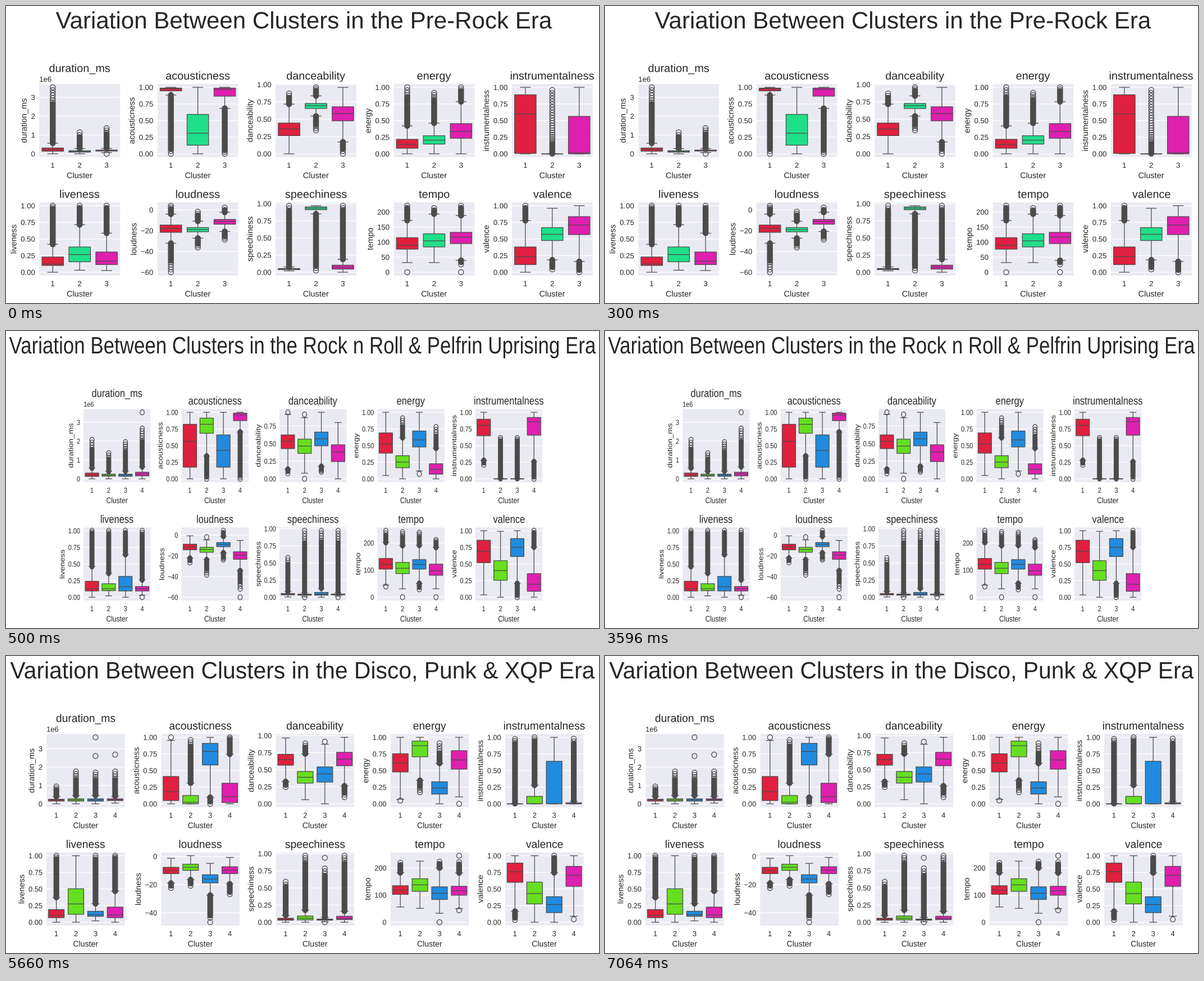
Animation, 1056 px wide and 530 px high, one loop 8 s. Source, as a matplotlib script:

```python
import math
import numpy as np
import matplotlib.pyplot as plt
from matplotlib.animation import FuncAnimation
from matplotlib.collections import LineCollection, PolyCollection
from matplotlib.patches import PathPatch
from matplotlib.path import Path
from matplotlib.textpath import TextPath
from matplotlib.transforms import Affine2D

W, H, DPI = 1056, 530, 64
PX = 72 / DPI
STEP, LOOP = 20, 8000
INK, LINE, PANEL = "#262626", "#4b4b4b", "#eaeaf2"
TITLE, HEAD, LABEL, TICK = 42.1, 19.85, 14.5, 13.15
ROWS, PANEL_W, PANEL_H, PITCH = (139.2, 350.5), 143.8, 130.5, 210.4
RING = 4.6

plt.rcParams["font.family"] = "Liberation Sans"
fig = plt.figure(figsize=(W / DPI, H / DPI), dpi=DPI, facecolor="white")
ax = fig.add_axes([0, 0, 1, 1])
ax.set(xlim=(0, W), ylim=(H, 0))
ax.axis("off")


def rect(x0, y0, x1, y1):
    return [(x0, y0), (x1, y0), (x1, y1), (x0, y1)]


def box(q1, med, q3, lo=-math.inf, hi=math.inf, stray=()):
    """Quartiles, extremes (the panel's own by default) and lone points."""
    return q1, med, q3, lo, hi, stray


def tick_step(extent):
    return next(s for s in (0.25, 1, 20, 50, 100) if extent / s < 4.5)


class Era:
    """One page of box plots, squeezed sideways by sx."""

    def __init__(self, title, mid, left, sx, n):
        self.left, self.sx, self.n, self.count = left, sx, n, 0
        rainbow = plt.get_cmap("gist_rainbow")
        self.colors = [np.array(rainbow(v)[:3]) * 0.75 + 0.125
                       for v in np.linspace(0, 1, n)]
        self.backs, self.grid, self.lines = [], [], []
        self.boxes, self.fills = [], []
        self.pills, self.pill_fills, self.glyphs = [], [], []
        self.text(title, mid, 40, TITLE)

    def text(self, s, x, y, size, align=0.5, upright=False):
        path = TextPath((0, 0), s, size=size)
        if upright:
            path = Affine2D().rotate_deg(90).transform_path(path)
        e = path.get_extents()
        shift = (0, -(e.y0 + e.y1) / 2) if upright else (-(e.x0 + align * e.width), 0)
        place = Affine2D().translate(*shift).scale(self.sx, -1).translate(x, y)
        self.glyphs.append(place.transform_path(path))
        return e.width

    def pill(self, x, a, b):
        a, b = sorted((a, b))
        t = np.linspace(0, np.pi, 13)
        arc = np.column_stack([RING * self.sx * np.cos(t), RING * np.sin(t)])
        self.pills.append(np.vstack([arc + (x, b), -arc + (x, a)]))
        self.pill_fills.append(LINE if b > a else "none")

    def tail(self, x, start, end, thin):
        """Dense run from the whisker, then rings with widening gaps."""
        size = abs(end - start)
        if size < 2:
            return
        loose = min(size, max(4, thin * size))
        edge = end + (start - end) * loose / size
        if size - loose > 2:
            self.pill(x, start, edge)
        n = math.ceil(loose / 4.5)
        for k in range(1, n + 1):
            y = edge + (end - edge) * (k / n) ** 1.2
            self.pill(x, y, y)

    def panel(self, name, span, *boxes, thin=0.08):
        row, col = divmod(self.count, 5)
        self.count += 1
        sx, top = self.sx, ROWS[row]
        x0, w = self.left + col * PITCH * sx, PANEL_W * sx
        mid, offset = x0 + w / 2, name == "duration_ms"
        self.backs.append(rect(x0, top, x0 + w, top + PANEL_H))

        # Data fills the panel but for a 5 % margin at either end.
        least, most = span
        extent = most - least
        unit = PANEL_H / 1.1 / extent

        def to_y(v):
            return top + PANEL_H - (v - least + 0.05 * extent) * unit

        step, widest = tick_step(extent), 0
        first = math.ceil((least - 0.05 * extent) / step)
        last = math.floor((most + 0.05 * extent) / step)
        for k in range(first, last + 1):
            y, v = to_y(k * step), k * step
            s = f"{v:.2f}" if step < 1 else str(v).replace("-", "\u2212")
            self.grid.append([(x0, y), (x0 + w, y)])
            widest = max(widest, self.text(s, x0 - 8 * sx, y + 4.7, TICK, 1))
        self.text(name, x0 - (widest + 16.3) * sx, top + PANEL_H / 2, LABEL, upright=True)
        self.text(name, mid, top - (21.5 if offset else 8), HEAD)
        self.text("Cluster", mid, top + 168, LABEL)
        if offset:
            self.text("1e6", x0 + sx, top - 4, TICK, 0)

        slot = w / self.n
        for i, (q1, med, q3, lo, hi, stray) in enumerate(boxes):
            x = x0 + slot * (i + 0.5)
            half, cap = slot * 0.4, slot * 0.2
            lo, hi, reach = max(lo, least), min(hi, most), 1.5 * (q3 - q1)
            low, high = to_y(max(lo, q1 - reach)), to_y(min(hi, q3 + reach))
            y1, ym, y3 = to_y(q1), to_y(med), to_y(q3)
            self.text(str(i + 1), x, top + 149.5, TICK)
            self.boxes.append(rect(x - half, y3, x + half, y1))
            self.fills.append(self.colors[i])
            self.lines += [[(x, high), (x, y3)], [(x, y1), (x, low)],
                           [(x - half, ym), (x + half, ym)]]
            self.lines += [[(x - cap, y), (x + cap, y)] for y in (low, high)]
            self.tail(x, high, to_y(hi), thin)
            self.tail(x, low, to_y(lo), thin)
            for v in stray:
                self.pill(x, to_y(v), to_y(v))

    def build(self):
        lw = 1.25 * PX
        self.artists = [
            PolyCollection(self.backs, facecolors=PANEL, edgecolors="none", zorder=1),
            LineCollection(self.grid, colors="white", linewidths=1.35 * PX, zorder=2),
            PolyCollection(self.boxes, facecolors=self.fills, edgecolors=LINE,
                           linewidths=lw, zorder=3),
            LineCollection(self.lines, colors=LINE, linewidths=lw, zorder=4),
            PolyCollection(self.pills, facecolors=self.pill_fills, edgecolors=LINE,
                           linewidths=lw, zorder=5),
        ]
        for a in self.artists:
            a.set_snap(False)
            ax.add_collection(a, autolim=False)
        text = PathPatch(Path.make_compound_path(*self.glyphs), fc=INK, lw=0, zorder=6)
        self.artists.append(ax.add_patch(text))

    def show(self, on):
        for a in self.artists:
            a.set_visible(on)


FULL, SPEECH = (0, 1), (0, 0.97)

pre = Era("Variation Between Clusters in the Pre-Rock Era", 530.5, 59.3, 1, 3)
pre.panel("duration_ms", (0, 3.53), box(.14, .23, .31), box(.09, .12, .165, hi=1.14),
          box(.145, .175, .2, hi=1.36), thin=.3)
pre.panel("acousticness", FULL, box(.947, .976, .989), box(.13, .31, .593),
          box(.867, .968, .989))
pre.panel("danceability", (0, .96), box(.262, .359, .444, hi=.87),
          box(.654, .695, .727, lo=.34), box(.476, .581, .679), thin=.4)
pre.panel("energy", FULL, box(.083, .142, .218), box(.146, .205, .272, hi=.917),
          box(.234, .336, .454), thin=.25)
pre.panel("instrumentalness", FULL, box(.006, .6, .888), box(0, 0, .001, hi=.96),
          box(0, .015, .563), thin=.85)
pre.panel("liveness", FULL, box(.102, .123, .229), box(.157, .266, .38, lo=.03),
          box(.115, .165, .304, lo=.025))
pre.panel("loudness", (-60, 4), box(-21.6, -17.9, -14.6),
          box(-21.1, -18.9, -17, lo=-36.2, hi=-1.7),
          box(-13.8, -11.1, -9.2, lo=-28.6, hi=2.1), thin=.4)
pre.panel("speechiness", SPEECH, box(.038, .046, .054, lo=.02),
          box(.912, .933, .953, lo=.025), box(.046, .074, .103))
pre.panel("tempo", (0, 221), box(76.6, 89.6, 114.8, lo=32, stray=[0]),
          box(84, 104.5, 127.8, lo=32, hi=213),
          box(95.2, 116.6, 132.5, lo=26, stray=[0]))
pre.panel("valence", FULL, box(.115, .233, .38), box(.477, .57, .671, lo=.043, hi=.966),
          box(.566, .709, .836))

rock = Era("Variation Between Clusters in the Rock n Roll & Pelfrin Uprising Era",
           528, 138.2, 0.829, 4)
rock.panel("duration_ms", (0, 3.53), box(.128, .2, .307, hi=2.07),
           box(.143, .19, .247, hi=1.36), box(.135, .2, .247, hi=1.95),
           box(.158, .26, .35, hi=2.67, stray=[3.53]), thin=.35)
rock.panel("acousticness", FULL, box(.175, .563, .82), box(.685, .82, .913),
           box(.175, .428, .66), box(.875, .96, .989))
rock.panel("danceability", (0, .945), box(.429, .532, .624, lo=.078),
           box(.361, .465, .564, lo=.08, hi=.915, stray=[0]),
           box(.469, .568, .664, lo=.1), box(.245, .381, .484, hi=.8), thin=.5)
rock.panel("energy", FULL, box(.386, .521, .69, lo=.05), box(.167, .251, .348, hi=.91),
           box(.479, .584, .719, lo=.074), box(.07, .142, .226, hi=.78), thin=.45)
rock.panel("instrumentalness", FULL, box(.648, .804, .896, lo=.21),
           box(0, 0, .002, hi=.614), box(0, 0, .002, hi=.614), box(.656, .858, .922))
rock.panel("liveness", FULL, box(.094, .127, .241), box(.098, .127, .203, lo=.02),
           box(.094, .157, .313), box(.094, .127, .161, lo=.03, stray=[0]))
rock.panel("loudness", (-60, 4.2), box(-14.2, -11.5, -8.8, lo=-26.4, hi=.2),
           box(-16.6, -13.9, -11.8, lo=-38.3, hi=-2),
           box(-11.2, -9.1, -7.2, lo=-23.7),
           box(-23.4, -19.3, -16.1, lo=-51.8, hi=-4.7, stray=[-60]), thin=.4)
rock.panel("speechiness", SPEECH, box(.034, .042, .054, hi=.573),
           box(.03, .038, .046, stray=[0]), box(.03, .046, .07),
           box(.034, .038, .046, stray=[0]), thin=.2)
rock.panel("tempo", (0, 245), box(103.5, 121, 142.8, lo=39.5),
           box(87, 106.6, 128.3, lo=31, hi=240, stray=[0]),
           box(103.5, 121, 138.6, lo=29, hi=238),
           box(80.8, 97.3, 122, lo=31, hi=211, stray=[0]), thin=.4)
rock.panel("valence", FULL, box(.519, .692, .857, lo=.035), box(.254, .401, .549),
           box(.612, .751, .882), box(.089, .195, .355))

disco = Era("Variation Between Clusters in the Disco, Punk & XQP Era",
            528, 72.2, 0.9705, 4)
disco.panel("duration_ms", (0, 3.62), box(.15, .21, .25, hi=.94),
            box(.147, .21, .27, hi=1.76), box(.147, .21, .27, hi=1.7, stray=[2.6, 3.62]),
            box(.177, .22, .27, hi=1.76, stray=[2.68]), thin=.35)
disco.panel("acousticness", FULL, box(.049, .184, .411), box(0, .024, .125, hi=.96),
            box(.584, .787, .909), box(.019, .108, .31), thin=.15)
disco.panel("danceability", (0, .975), box(.566, .648, .726, lo=.245),
            box(.303, .389, .475, lo=.06, hi=.886), box(.319, .438, .541, hi=.911),
            box(.558, .656, .755, lo=.097), thin=.4)
disco.panel("energy", FULL, box(.479, .614, .753, lo=.049), box(.707, .875, .943, lo=.175),
            box(.146, .239, .331, hi=.91), box(.521, .66, .799, lo=.09, stray=[0]), thin=.5)
disco.panel("instrumentalness", FULL, box(0, 0, .002, hi=.975), box(0, .003, .112),
            box(0, .003, .64), box(0, .003, .015, hi=.98))
disco.panel("liveness", FULL, box(.068, .102, .19), box(.119, .275, .503),
            box(.089, .115, .165, lo=.02), box(.068, .11, .228))
disco.panel("loudness", (-46.7, .5), box(-12.2, -10, -7.7, lo=-22.4, hi=-1.3),
            box(-9.9, -7.7, -5.5, lo=-20.8),
            box(-18.8, -16, -13, lo=-43.5, hi=-4.9, stray=[-46.7]),
            box(-12.2, -9.7, -7.3, lo=-26.8, hi=-.7))
disco.panel("speechiness", SPEECH, box(.03, .042, .058, hi=.59), box(.034, .058, .091),
            box(.03, .038, .046, hi=.785, stray=[0, .94]), box(.038, .054, .087), thin=.15)
disco.panel("tempo", (0, 245), box(102.5, 118, 134.5, lo=56, hi=219),
            box(113.8, 137.6, 160.3, lo=51, hi=225),
            box(83.9, 106.6, 130.4, lo=33, hi=223, stray=[0]),
            box(99.4, 116, 132.4, lo=44, hi=221, stray=[245]))
disco.panel("valence", FULL, box(.6, .76, .89, lo=.035), box(.275, .431, .604),
            box(.144, .266, .384), box(.54, .705, .84, lo=.043))

ERAS = ((0, pre), (500, rock), (5660, disco))
for _, era in ERAS:
    era.build()


def update(i):
    current = [era for start, era in ERAS if start <= i * STEP][-1]
    for _, era in ERAS:
        era.show(era is current)
    return []


anim = FuncAnimation(fig, update, frames=LOOP // STEP, interval=STEP,
                     repeat=True, repeat_delay=0, cache_frame_data=False)
plt.show()
```
